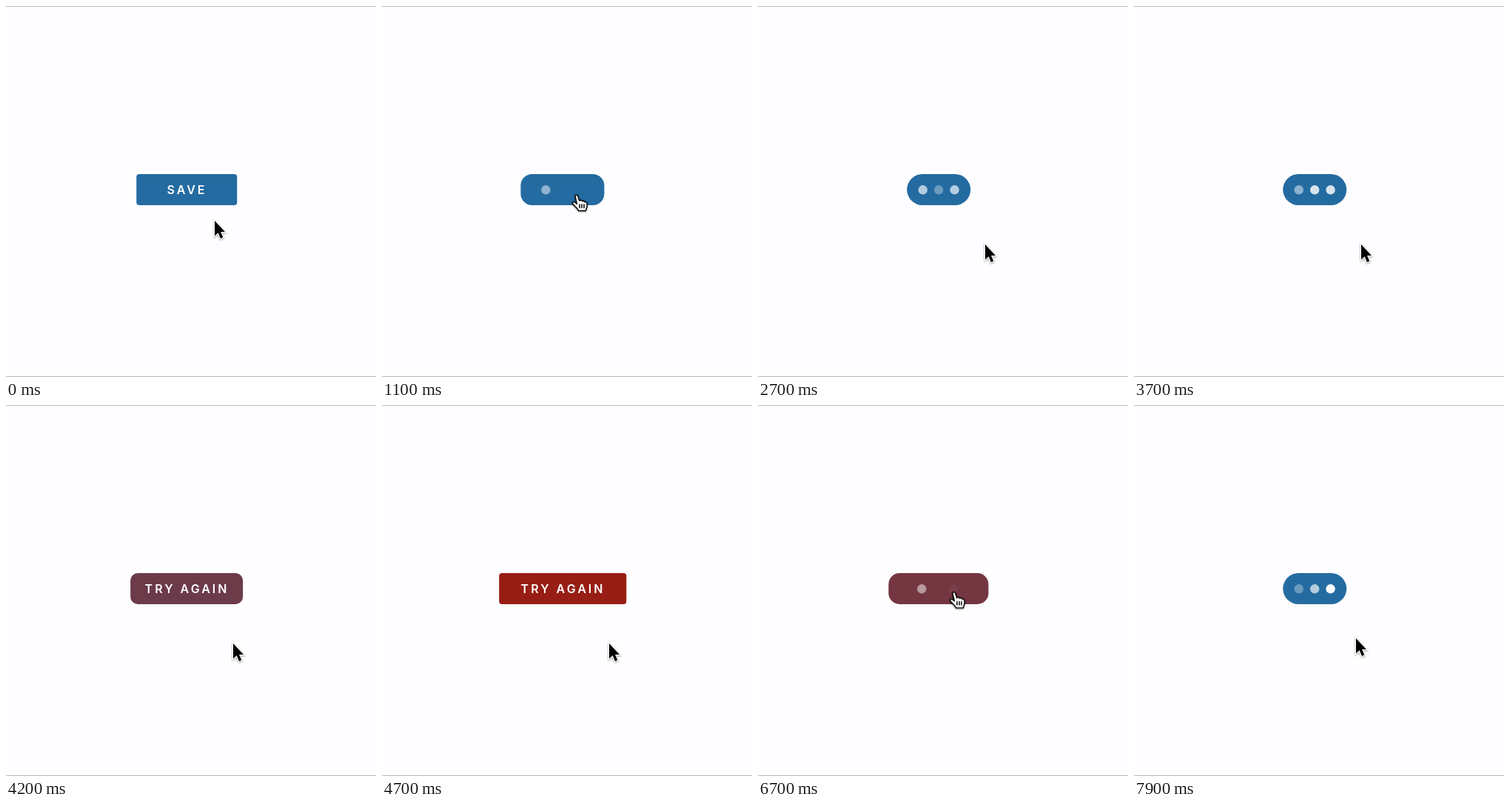
An HTML page for the animation above (8000 ms loop, 500 by 501 pixels).

```html
<!DOCTYPE html>
<html lang="en">
<head>
<meta charset="utf-8">
<title>Save button</title>
<style>
  :root { --blue: #246ba1; --red: #a1180a; --loop: 8s; }
  html, body { margin: 0; width: 100%; height: 100%; overflow: hidden; background: #fefdff; }
  .stage {
    position: relative; width: 500px; height: 501px; overflow: hidden; box-sizing: border-box;
    border: solid #b9b9bc; border-width: 1px 0;
  }
  .stage > * { position: absolute; }
  .button {
    left: 244px; top: 225.8px; width: 135.5px; height: 42.7px;
    border-radius: 4px; background: var(--blue); transform: translateX(-50%);
    animation: size var(--loop) infinite, tint var(--loop) infinite;
  }
  svg { left: 0; top: -1px; width: 500px; height: 501px; overflow: visible; }
  text {
    font: 600 16px Inter, Roboto, sans-serif; letter-spacing: 3px;
    text-anchor: middle; fill: #fff; opacity: 0;
  }
  .save { animation: save var(--loop) linear infinite; }
  .retry { animation: retry var(--loop) linear infinite; }
  .dots { animation: dots var(--loop) linear infinite, settle var(--loop) ease-in-out infinite; }
  .dots circle { fill: #fff; opacity: 0; animation: pulse var(--loop) linear infinite; }
  .dots circle:nth-child(2) { animation-delay: .4s; }
  .dots circle:nth-child(3) { animation-delay: .8s; }
  .cursor { animation: move var(--loop) infinite; filter: drop-shadow(0 1px 1px #0006); }
  .arrow { animation: arrow var(--loop) step-end infinite; }
  .hand { animation: hand var(--loop) step-end infinite; }

  @keyframes size {
    0%, 9.375% { width: 135.5px; border-radius: 4px; animation-timing-function: ease-in-out; }
    18.75%, 46.25% { width: 85.5px; border-radius: 30px; animation-timing-function: ease-in-out; }
    55.625%, 79.5% { width: 171.5px; border-radius: 4px; animation-timing-function: ease-in-out; }
    88.875%, 100% { width: 85.5px; border-radius: 30px; }
  }
  @keyframes tint {
    0%, 46.25% { background: var(--blue); animation-timing-function: ease; }
    65%, 79.5% { background: var(--red); animation-timing-function: ease; }
    98.25%, 100% { background: var(--blue); }
  }
  @keyframes save {
    0%, 9.375% { opacity: 1; }
    12%, 100% { opacity: 0; }
  }
  @keyframes retry {
    0%, 47% { opacity: 0; }
    51%, 79.5% { opacity: 1; }
    82%, 100% { opacity: 0; }
  }
  @keyframes dots {
    0%, 8.75% { opacity: 0; }
    8.76%, 46.25% { opacity: 1; }
    47.5%, 78.75% { opacity: 0; }
    78.76%, 100% { opacity: 1; }
  }
  @keyframes settle {
    0%, 9.375% { transform: translateX(-2.7px); }
    18.75%, 50% { transform: none; }
    51%, 79.5% { transform: translateX(-2.7px); }
    88.875%, 100% { transform: none; }
  }
  @keyframes pulse {
    0%, 8.75%, 78.75% { opacity: 0; }
    18.75%, 38.75%, 88.75% { opacity: 1; }
    28.75%, 48.75%, 98.75%, 100% { opacity: .33; }
  }
  @keyframes move {
    0%, .6% { transform: translate(282px, 290px); animation-timing-function: ease-in-out; }
    7.5%, 18.125% { transform: translate(262px, 255px); animation-timing-function: ease-in; }
    20% { transform: translate(274px, 270px); animation-timing-function: ease-out; }
    28.75%, 68.125% { transform: translate(307px, 322px); animation-timing-function: ease-in-out; }
    72.5% { transform: translate(267.5px, 264px); animation-timing-function: ease-out; }
    78.125%, 86.875% { transform: translate(264px, 252.5px); animation-timing-function: ease-in; }
    90% { transform: translate(272px, 274px); animation-timing-function: ease-out; }
    98%, 100% { transform: translate(300px, 315px); }
  }
  @keyframes arrow {
    0%, 20%, 90% { visibility: visible; }
    4.4%, 71.5% { visibility: hidden; }
  }
  @keyframes hand {
    0%, 20%, 90% { visibility: hidden; }
    4.4%, 71.5% { visibility: visible; }
  }
</style>
</head>
<body>
<div class="stage">
  <div class="button"></div>
  <svg viewBox="0 0 500 501">
    <text class="save" x="244.5" y="254.3">SAVE</text>
    <text class="retry" x="244.5" y="254.3">TRY AGAIN</text>
    <g class="dots">
      <circle cx="222.8" cy="248.3" r="6.2"/>
      <circle cx="244.2" cy="248.3" r="6.2"/>
      <circle cx="265.6" cy="248.3" r="6.2"/>
    </g>
    <g class="cursor">
      <path class="arrow" d="M0 0V20.5L4.7 16.2L7.9 24L11.3 22.6L8.1 15H14Z"
        stroke="#fff" stroke-width="2.4" paint-order="stroke"/>
      <g class="hand" stroke="#000" stroke-width="1.5" stroke-linejoin="round" stroke-linecap="round">
        <path fill="#fff" d="M-1 2.2C-1.3-.2 2-.5 2.8 1.8L4.8 8C5.6 6.8 8 7 8.6 8.6C9.8 7.6 11.6 8.1 12.2 9.8
          C13.6 9.2 15 10.2 15.1 12V15.2C15 17.6 13.6 18.8 13.3 21.6H3.6C3 19-.6 16.4-3.8 12.8
          C-5.6 10.6-3.4 8.6-1.2 10.2L1.4 12.2Z"/>
        <path fill="none" d="M5 13v4.6M8 13v4.6M11 13v4.6"/>
      </g>
    </g>
  </svg>
</div>
</body>
</html>
```
